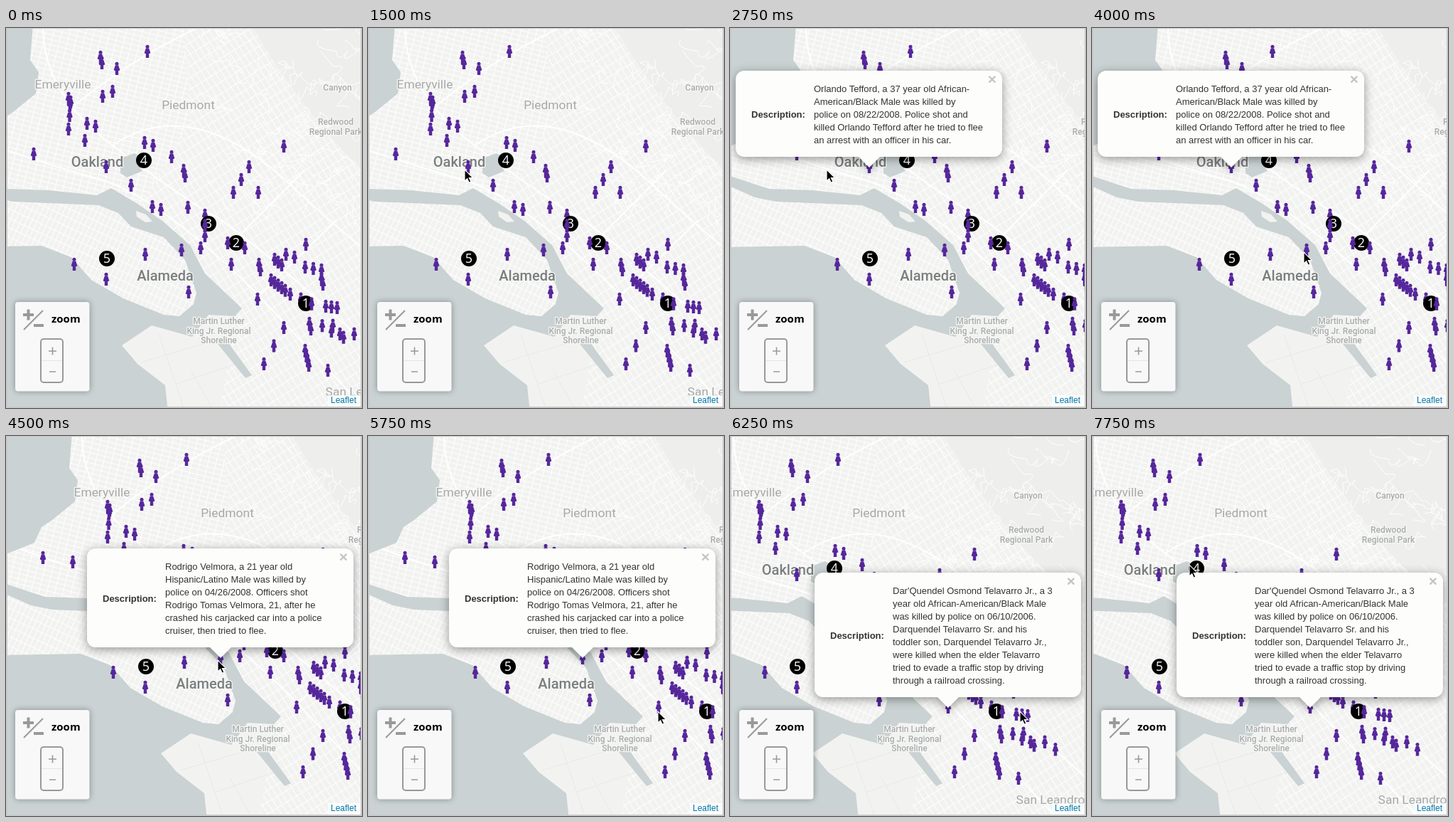
An HTML page that plays this animation: 501 px wide and 534 px high, repeating every 8000 ms.

```html
<!DOCTYPE html>
<html lang="en">
<head>
<meta charset="utf-8">
<title>Map with popups</title>
<style>
html, body { margin: 0; width: 100%; height: 100%; overflow: hidden; background: #f3f4f2; }
svg { display: block; width: 501px; height: 534px; }
text { font-family: "Liberation Sans", Arial, sans-serif; }
.place { font-family: Roboto, sans-serif; text-anchor: middle; stroke: #f6f7f5; stroke-width: 2.5px; stroke-linejoin: round; paint-order: stroke; }
.city { font-size: 20px; font-weight: 500; fill: #7b7e7f; }
.town { font-size: 17.4px; fill: #a6a9a9; }
.park { font-size: 12px; font-weight: 500; fill: #a9acac; }
.num { font: 18px "Open Sans", sans-serif; fill: #fff; text-anchor: middle; }
.popup { filter: drop-shadow(0 3px 7px rgba(0,0,0,.4)); }
.popup text { font-size: 13px; fill: #333; }
.popup .close { font-size: 21px; font-weight: bold; fill: #c3c3c3; text-anchor: middle; }
.panel { filter: drop-shadow(0 0 4px rgba(0,0,0,.35)); }
</style>
</head>
<body>
<svg viewBox="0 0 501 534" xmlns="http://www.w3.org/2000/svg">
  <defs>
    <g id="person" fill="#56279b">
      <circle cy="-6.8" r="2.5"/>
      <path d="M-2.2-4.4H2.2L4.3 2 3.2 3H2.2V9H-2.2V3H-3.2L-4.3 2Z"/>
    </g>
  </defs>
  <g id="map">
    <g id="ground"></g>
    <g id="labels"></g>
    <g id="pins"></g>
    <g id="popups"></g>
  </g>
  <g class="panel"><rect x="13" y="385" width="104.5" height="125.5" rx="4" fill="#f8f8f8"/></g>
  <g fill="none" stroke="#999">
    <path d="M24 403H39M31.500 395.500V410.500M39 418H53" stroke-width="4"/>
    <path d="M25 424L52 397" stroke-width="2"/>
    <path d="M50 467.500H80" stroke="#e4e4e4"/>
    <rect x="49" y="437" width="31" height="61" rx="4" stroke-width="2"/>
    <path d="M60 454H71M65.500 448.500V459.500M61 483H70" stroke-width="1.6"/>
  </g>
  <text x="64" y="413.500" style="font:bold 15px 'Open Sans',sans-serif">zoom</text>
  <rect x="453" y="516" width="46" height="16" fill="#fff" fill-opacity=".7"/>
  <text x="457" y="527" font-size="12" fill="#0078a8">Leaflet</text>
  <path id="cursor" d="M0 0V16L3.700 12.600 6.200 18.200 8.800 17 6.300 11.600H11.500Z" stroke="#fff" stroke-width="1.1"/>
  <path d="M0 0H501V534H0ZM2 1V532H499V1Z" fill="#c9c9c9" fill-rule="evenodd"/>
</svg>
<script>
const LOOP = 8000, STEP = 250;
const $ = id => document.getElementById(id);
const ramp = (t, from, span) => Math.min(1, Math.max(0, (t - from) / span));
const range = n => Array.from({ length: n }, (_, i) => i);

let seed = 11;
const rand = () => (seed = (seed * 16807) % 2147483647) / 2147483647;

// A street grid as a tiled pattern
const grid = (id, w, h, angle) => `
  <pattern id="${id}" width="${w}" height="${h}" patternUnits="userSpaceOnUse" patternTransform="rotate(${angle})">
    <path d="M0 .5H${w}M.5 0V${h}" stroke="#fff" stroke-width=".9"/></pattern>`;

const fill = (d, color) => `<path d="${d}" fill="${color}"/>`;
const line = (d, color, width) => `<path d="${d}" fill="none" stroke="${color}" stroke-width="${width}"/>`;

function hillRoad() {
  const bend = () => range(4).map(() => (rand() * 38 - 12).toFixed(1)).join(" ");
  return `M${270 + rand() * 300} ${rand() * 260 - 20}` + range(4).map(() => "q" + bend()).join("");
}

function drawGround() {
  const land = "#f2f3f1", sea = "#cad2d3";
  const alameda = "M-70 216L-20 238 10 244 130 249 158 260 176 279 222 294 252 326 268 372 " +
    "264 388 244 405 222 403 165 380 120 354 92 322 50 306 -70 308Z";
  const bay = "M-70-5H38L34 45 46 62 42 92 10 118-5 128-15 150-70 172Z";
  const estuary = "M-70 203L0 226 60 228 128 235 148 225 185 247 220 271 259 305 280 345 332 394 " +
    "322 405 285 403 262 434 205 418 163 446 185 472 224 502 228 540H-70Z";
  const lake = "M161 183L181 176 188 180 184 190 192 201 170 210 161 204Z";
  const creek = "M298 444L310 438 346 488 337 492Z";
  const highways = "M52-5Q50 90 150 165T290 262T470 410L570 500M-60 150Q50 190 130 212T345 365L510 540" +
    "M95 110Q180 40 280-5M150 165Q260 90 400 220T570 350M320 300L420 200M356 376L465 270";
  $("ground").innerHTML = grid("west", 11, 7, 14) + grid("east", 8, 14, -32) + grid("isle", 7, 12, 25) +
    fill("M-80-10H580V540H-80Z", land) +
    fill("M-80-10H250L260 130 190 250H-80Z", "url(#west)") +
    fill("M250-10H345L430 130 570 260V540H300L320 430 190 250 260 130Z", "url(#east)") +
    fill("M345-5Q400 90 470 168T570 240V-5Z", "#eeefed") +
    line(range(60).map(hillRoad).join(""), "#fff", 1) +
    line("M190 470L290 440M215 430L250 534M240 500L330 470M260 480L290 534", "#e6e9e8", 1) +
    line(highways, "#fff", 2) +
    fill(bay + estuary + lake + creek, sea) +
    fill(alameda, land) + fill(alameda, "url(#isle)") +
    fill("M183 257L197 262 206 272 196 273 184 265Z", land);
}

function drawLabels() {
  const label = (kind, name, x, y) => `<text class="place ${kind}" x="${x}" y="${y}">${name}</text>`;
  const stack = (names, x, y) => names.map((s, i) => label("park", s, x, y + 13.6 * i)).join("");
  $("labels").innerHTML =
    label("city", "Oakland", 128.5, 195) + label("city", "Alameda", 224, 355) +
    label("town", "Emeryville", 80, 85) + label("town", "Piedmont", 256.5, 114) +
    label("town", "San Leandro", 498, 517) + stack(["Canyon"], 466.5, 88) +
    stack(["Redwood", "Regional Park"], 464, 136) +
    stack(["Martin Luther", "King Jr. Regional", "Shoreline"], 299.5, 416);
}

// Evenly spaced pins along a street
const street = (x, y, dx, dy, n) => range(n).map(i => [x + dx * i, y + dy * i]);
const stacked = ([x, y]) => street(x, y, 2, 8, 2);
const beside = ([x, y]) => street(x, y, 12, 4, 2);

function drawPins() {
  const single = [
    [199, 33], [156, 57], [39, 177], [-3, 171], [233, 181], [141, 195], [176, 221], [391, 166], [355, 231],
    [256, 252], [196, 318], [96, 332], [141, 353], [257, 371], [317, 332], [354, 381], [422, 304], [453, 481]
  ];
  const people = [
    ...single,
    ...[[133, 41], [88, 99], [250, 200], [356, 332], [427, 415], [444, 352]].flatMap(stacked),
    ...[[195, 161], [114, 134], [206, 251], [394, 318], [458, 426]].flatMap(beside),
    ...street(111, 158, 0, 0, 1),
    ...street(136, 96, 14, -7, 2),
    ...street(88, 142, 1.5, -19, 3),
    ...street(342, 195, -11, 18, 3),
    ...street(280, 263, 0, 14.5, 3),
    ...street(247, 312, 27, -3, 2),
    ...street(312, 302, 24, 7, 2),
    ...street(378, 325, 5, 4, 3),
    ...street(421, 336, 11.5, 2, 3),
    ...street(373, 354, 5, 3.7, 5),
    ...street(450, 391, 8, 1, 3),
    ...street(391, 421, -14, 25.5, 3),
    ...street(421, 453, 1.7, 7, 4),
    ...range(8).map(i => [400 + 15 * i, 368 + 9 * i + rand() * 24])
  ];
  const numbered = [[422, 387], [324, 302], [285, 275], [194, 186], [142, 324]].map(([x, y], i) => [x, y, i + 1]);
  // Pins further south overlap those further north
  $("pins").innerHTML = [...numbered, ...people].sort((a, b) => a[1] - b[1]).map(([x, y, n]) => n
    ? `<circle cx="${x}" cy="${y}" r="11"/><text class="num" x="${x}" y="${y + 6}">${n}</text>`
    : `<use href="#person" x="${x}" y="${y}"/>`).join("");
}

const popups = [
  { x: -47, y: 60, open: 2490, pan: 55, lines: [
    "Orlando Tefford, a 37 year old African-", "American/Black Male was killed by",
    "police on 08/22/2008. Police shot and", "killed Orlando Tefford after he tried to flee",
    "an arrest with an officer in his car."] },
  { x: 59, y: 158, open: 4000, pan: 0, lines: [
    "Rodrigo Velmora, a 21 year old", "Hispanic/Latino Male was killed by",
    "police on 04/26/2008. Officers shot", "Rodrigo Tomas Velmora, 21, after he",
    "crashed his carjacked car into a police", "cruiser, then tried to flee."] },
  { x: 166, y: 192, open: 5750, pan: -102, lines: [
    "Dar'Quendel Osmond Telavarro Jr., a 3", "year old African-American/Black Male",
    "was killed by police on 06/10/2006.", "Darquendel Telavarro Sr. and his",
    "toddler son, Darquendel Telavarro Jr.,", "were killed when the elder Telavarro",
    "tried to evade a traffic stop by driving", "through a railroad crossing."] }
];

function drawPopups() {
  $("popups").innerHTML = popups.map(({ x, y, lines }) => {
    const h = 31 + 18 * lines.length;
    const rows = lines.map((s, i) => `<text x="110" y="${30 + 18 * i}">${s}</text>`).join("");
    return `<g transform="translate(${x} ${y})"><g class="popup">
      <rect width="375" height="${h}" rx="12" fill="#fdfdfc"/>
      <path d="M172 ${h - 1}H204L188 ${h + 15}Z" fill="#fdfdfc"/>
      <text x="22" y="${h / 2 + 5}" font-weight="bold">Description:</text>${rows}
      <text class="close" x="361" y="19">×</text></g></g>`;
  }).join("");
}

const moves = [
  { from: 500, to: 1250, x: 124, y: 180 },
  { from: 1250, to: 1500, x: 136, y: 199 },
  { from: 3000, to: 4000, x: 298, y: 315 },
  { from: 4500, to: 5500, x: 408, y: 387 },
  { from: 6250, to: 7750, x: 137, y: 181 }
];

function cursorAt(t) {
  let x = 212, y = 205;
  for (const m of moves) {
    const f = ramp(t, m.from, m.to - m.from);
    x += (m.x - x) * f;
    y += (m.y - y) * f;
  }
  return `translate(${x} ${y})`;
}

function render(time) {
  const t = Math.floor((time % LOOP) / STEP) * STEP;
  const pan = popups.reduce((sum, p) => sum + p.pan * ramp(t, p.open, 250), 0);
  $("map").setAttribute("transform", `translate(${Math.round(pan)} 0)`);
  popups.forEach((p, i) => {
    const next = popups[i + 1];
    const gone = next ? ramp(t, next.open, 500) : 0;
    const shown = ramp(t, p.open, 250) ** 2 * (1 - gone);
    const el = $("popups").children[i];
    el.setAttribute("opacity", shown);
    el.setAttribute("visibility", shown ? "visible" : "hidden");
  });
  $("cursor").setAttribute("transform", cursorAt(t));
  $("cursor").setAttribute("visibility", t < 500 ? "hidden" : "visible");
}

drawGround();
drawLabels();
drawPins();
drawPopups();

const start = performance.now();
function tick() {
  render(performance.now() - start);
  requestAnimationFrame(tick);
}
tick();
</script>
</body>
</html>
```
